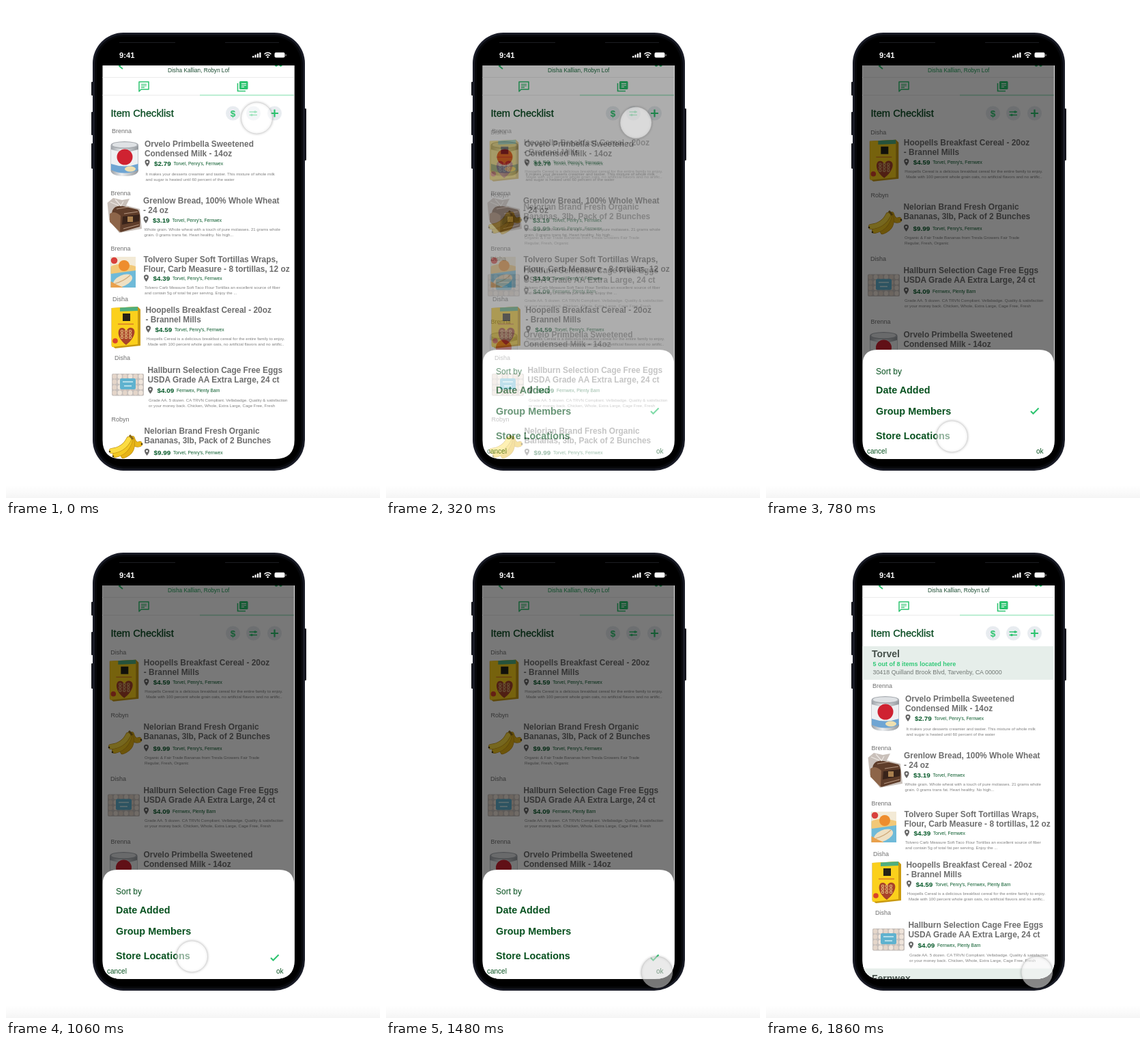
An HTML page that plays this animation: 548x720 px, repeating every 1.88 s.

```html
<!DOCTYPE html>
<html lang="en">
<head>
<meta charset="utf-8">
<title>Checklist sorting</title>
<style>
html, body { margin: 0; width: 100%; height: 100%; overflow: hidden; background: #fff; }
svg { display: block; width: 548px; height: 720px; font-family: "Liberation Sans", Arial, sans-serif; }
.label { font-size: 9px; fill: #707070; }
.title { font-size: 11.9px; font-weight: 700; fill: #6d6d6d; }
.price { font-size: 9.9px; font-weight: 700; fill: #075a2a; }
.stores { font-size: 6.65px; fill: #075a2a; }
.note { font-size: 6.08px; fill: #808080; }
.heading { font-size: 14.7px; fill: #074a20; stroke: #074a20; stroke-width: .3; }
.option { font-size: 14.4px; font-weight: 700; fill: #07511f; }
.small { font-size: 10px; fill: #07511f; }
</style>
</head>
<body>
<svg id="stage" viewBox="0 0 548 720"></svg>
<script>
const LOOP = 1880;
const GREEN = '#2cc46f';

const text = (cls, x, y, s, extra = '') =>
  `<text class="${cls}" x="${x}" y="${y}" ${extra}>${s.replace(/&/g, '&amp;')}</text>`;
const rect = (x, y, w, h, fill, r = 0, extra = '') =>
  `<rect x="${x}" y="${y}" width="${w}" height="${h}" rx="${r}" fill="${fill}" ${extra}/>`;
const disc = (x, y, r, fill) => `<circle cx="${x}" cy="${y}" r="${r}" fill="${fill}"/>`;
const oval = (x, y, rx, ry, fill, extra = '') =>
  `<ellipse cx="${x}" cy="${y}" rx="${rx}" ry="${ry}" fill="${fill}" ${extra}/>`;
const shape = (d, fill, extra = '') => `<path d="${d}" fill="${fill}" ${extra}/>`;
const line = (d, color, width = 1, extra = '') =>
  `<path d="${d}" fill="none" stroke="${color}" stroke-width="${width}" ${extra}/>`;
const group = (content, extra = '') => `<g ${extra}>${content}</g>`;
const repeat = (n, draw) => Array.from({ length: n }, (_, i) => draw(i)).join('');

function banana(d, color) {
  const round = 'stroke-linecap="round"';
  return line(d, '#b98a12', 8, round) + line(d, color, 6.800, round);
}

const pictures = {
  can: () =>
    shape('M153.500 204V241Q155 249 174 249Q192 249 194 241V204Z', 'url(#metal)') +
    oval(173.800, 203.500, 20.200, 5.500, '#a9adb2') + oval(173.800, 203.200, 18, 4, '#dfe2e5') +
    shape('M154 210Q174 217 193.500 210V239Q174 248 154 239Z', '#eef0f2') +
    shape('M154 231Q174 238 193.500 231V240Q174 249 154 240Z', '#6fa5d3') +
    oval(182, 238.500, 8, 4, '#efe0b0') + disc(174, 221, 11.500, '#cf2231'),
  bread: () =>
    shape('M148.500 288L157 281L170 284L181 282L176 292L196 297L199 326L166 332L151 313Z', '#c9c0ba') +
    shape('M156 299Q160 291 172 293L193 298Q198 303 196 323L168 331L152 315Z', '#5f3d2a') +
    shape('M152 304Q159 299 168 307L167 331L152 316Z', '#8d6549') +
    shape('M171 308L196 305L195 315L170 320Z', '#38231a') +
    line('M153 287L165 292M160 283L168 292M172 286L168 293', '#eee8e4', 1.300) +
    line('M162 297L180 294M173 304L193 301M172 326L195 320', '#b59680', 1.200) +
    rect(178, 308, 8, 8, '#a9804f'),
  tortillas: () =>
    rect(153.500, 367, 36.500, 45, '#6fbad8') +
    rect(153.500, 367, 36.500, 16, '#f3ead6') +
    shape('M153.500 381Q168 374 190 381V387L153.500 392Z', '#f2c877') +
    oval(171, 402, 15, 8, '#efe0c2', 'transform="rotate(-24 171 402)"') +
    shape('M153.500 403Q162 408 172 412H153.500Z', '#e9a04c') +
    line('M160 406Q172 403 182 394', '#cfa978', 1.200) +
    disc(158.500, 372.500, 4.800, '#d8413c') + disc(173, 380, 8, '#ee8d2e'),
  cereal: () =>
    shape('M154.500 442L193 440L197 444V497L160 501L154.500 497Z', '#c99a10') +
    shape('M155 442L193 440V495L155 499Z', '#fbd01c') +
    shape('M167 441.500L193 440V446L167 447Z', '#4fae7f') +
    rect(171, 450, 11, 11, '#252217') +
    line('M164 465.500H187', '#d97a28', 1.300) +
    shape('M176 496C161 485 163 471 170 471Q174 471 176 476Q179 470 184 471C192 473 189 486 176 496Z', '#a8432a') +
    repeat(9, i => `<circle cx="${170 + i % 3 * 6}" cy="${476 + (i / 3 | 0) * 4.500}" r="1.700" fill="none" stroke="#dcae72" stroke-width="1.2"/>`) +
    disc(160, 490, 3.800, '#d8432b'),
  eggs: () =>
    rect(155, 538, 47, 32.500, '#c6bfbb', 2) +
    repeat(24, i => oval(159 + i % 6 * 7.700, 542 + (i / 6 | 0) * 8, 3.200, 3.500, i % 2 ? '#efe4da' : '#e4d5c9')) +
    rect(167, 545, 23, 16, '#5fb2cf', 2) +
    line('M171 550H186M173 556H184', '#d2edf2', 1.500),
  bananas: () =>
    banana('M185 633Q188 644 196 641', '#e9b81a') +
    banana('M184 635Q188 652 172 658', '#e6b316') +
    banana('M182 634Q178 653 160 657', '#f3c921') +
    banana('M180 634Q173 649 155 651', '#fbdc43') +
    line('M181 628L186 634', '#8a6a18', 3) +
    disc(152, 652, 1.300, '#4a3a12') + disc(157, 659, 1.300, '#4a3a12') + disc(199, 641, 1.300, '#4a3a12'),
};

const DAIRY = "Torvel, Penry's, Fernwex";
// label: [text, x, y], at: title start, price and note: offsets below the title
const items = {
  can: { label: ['Brenna', 155, 186], at: [203, 206], price: ['$2.79', 27.5], stores: DAIRY, noteY: 41.5,
    title: ['Orvelo Primbella Sweetened', 'Condensed Milk - 14oz'],
    note: ['It makes your desserts creamier and tastier. This mixture of whole milk', 'and sugar is heated until 60 percent of the water'] },
  bread: { label: ['Brenna', 153.5, 277], at: [201, 289], price: ['$3.19', 27.5], stores: DAIRY, noteY: 39.5,
    title: ['Grenlow Bread, 100% Whole Wheat', '- 24 oz'],
    note: ['Whole grain. Whole wheat with a touch of pure molasses. 21 grams whole', 'grain. 0 grams trans fat. Heart healthy. No high...'] },
  tortillas: { label: ['Brenna', 153.5, 358], at: [201.5, 374.5], price: ['$4.39', 27.5], stores: DAIRY, noteY: 39.5,
    title: ['Tolvero Super Soft Tortillas Wraps,', 'Flour, Carb Measure - 8 tortillas, 12 oz'],
    note: ['Tolvero Carb Measure Soft Taco Flour Tortillas an excellent source of fiber', 'and contain 5g of total fat per serving. Enjoy the ...'] },
  cereal: { label: ['Disha', 156, 432], at: [204.5, 448.5], price: ['$4.59', 28], stores: DAIRY, noteY: 40,
    title: ['Hoopells Breakfast Cereal - 20oz', '- Brannel Mills'],
    note: ['Hoopells Cereal is a delicious breakfast cereal for the entire family to enjoy.', ' Made with 100 percent whole grain oats, no artificial flavors and no artific..'] },
  eggs: { label: ['Disha', 159, 518], at: [207.5, 536.5], price: ['$4.09', 29.5], stores: 'Fernwex, Plenty Barn', noteY: 42,
    title: ['Hallburn Selection Cage Free Eggs', 'USDA Grade AA Extra Large, 24 ct'],
    note: ['Grade AA. 5 dozen. CA TRVN Compliant. Vellabadge. Quality & satisfaction', 'or your money back. Chicken, Whole, Extra Large, Cage Free, Fresh'] },
  bananas: { label: ['Robyn', 154.5, 608], at: [202.5, 626], price: ['$9.99', 30.5], stores: DAIRY, noteY: 43,
    title: ['Nelorian Brand Fresh Organic', 'Bananas, 3lb, Pack of 2 Bunches'],
    note: ['Organic & Fair Trade Bananas from Tresla Growers Fair Trade', 'Regular, Fresh, Organic'] },
};

function pin(x, y) {
  return shape(`M${x} ${y + 5}C${x - 5.4} ${y - 1} ${x - 4} ${y - 5.2} ${x} ${y - 5.2}S${x + 5.4} ${y - 1} ${x} ${y + 5}Z`, '#666') +
    disc(x, y - 1.500, 1.400, '#fff');
}

function item(key, dx = 0, dy = 0, stores = items[key].stores) {
  const { label, at: [x, y], price, title, note, noteY } = items[key];
  const priceY = y + price[1];
  return group(
    pictures[key]() +
    text('label', label[1], label[2], label[0]) +
    title.map((s, i) => text('title', x, y + i * 14, s)).join('') +
    pin(x + 4, priceY - 3.500) +
    text('price', x + 14, priceY, price[0]) +
    text('stores', x + 42.500, priceY - .8, stores) +
    note.map((s, i) => text('note', x + 1.500 + (s[0] === ' ' ? 2 : 0), y + noteY + i * 8, s.trim())).join(''),
    `transform="translate(${dx} ${dy})"`);
}

function header(nameColor) {
  const slider = y => line(`M356.500 ${y}H368`, GREEN, 1.300);
  return rect(141, 87, 282, 576, '#fff') +
    line('M171 84L166 88L171 92', GREEN, 1.800) +
    disc(396, 86.500, 2.200, GREEN) + disc(402.500, 86.500, 2.200, GREEN) +
    text('', 237, 97, 'Disha Kallian, Robyn Lof', `font-size="8.26" fill="${nameColor}"`) +
    line('M141 104.500H422M141 130.500H284', '#ececec') +
    line('M284 130.500H422', '#a5e8c4', 1.500) +
    line('M195 111H209V122H198L195 125Z', GREEN, 1.500, 'stroke-linejoin="round"') +
    line('M198 114.500H206M198 116.800H206M198 119.100H203', GREEN, 1.100) +
    rect(342, 110, 12.500, 12, GREEN, 1.500) +
    line('M339.500 113V124.500H351', GREEN, 1.600) +
    line('M345 113.500H352M345 116H352M345 118.500H349', '#fff', 1.200) +
    text('heading', 153.500, 162, 'Item Checklist') +
    [332.500, 362.500, 393.500].map(x => disc(x, 157, 10.500, '#e8ecf0')).join('') +
    text('', 332.500, 162, '$', `font-size="13.5" font-weight="700" text-anchor="middle" fill="${GREEN}"`) +
    slider(155) + slider(159.500) + disc(365, 155, 1.700, GREEN) + disc(360, 159.500, 1.700, GREEN) +
    line('M388 157H399M393.500 151.500V162.500', GREEN, 2.200);
}

const tick = (id, y) =>
  line(`M388 ${y}L391.500 ${y + 3.5}L399.500 ${y - 4.5}`, GREEN, 2, `id="${id}"`);

const storeBand = (y, name, nameY = y + 16) => rect(141, y, 281, 49, '#e6eeea') +
  text('', 155, nameY, name, 'font-size="14" font-weight="700" fill="#45504a"');

const byDate = header('#1d4d33') + Object.keys(items).map(key => item(key)).join('');

const sortSheet = header('#1fa35a') +
  item('cereal', -2.700, -244.300) + item('bananas', -1, -328) + item('eggs', -6, -145.500) + item('can', -1.500, 279) +
  rect(141, 87, 281, 576, '#000', 0, 'opacity=".53"') +
  shape('M141.500 663V525Q141.500 503 163.500 503H400Q422 503 422 525V663Z', '#fff') +
  text('', 161, 539, 'Sort by', 'font-size="12" fill="#07511f"') +
  text('option', 161, 566.500, 'Date Added') +
  text('option', 161, 598, 'Group Members') +
  text('option', 161, 634, 'Store Locations') +
  tick('memberTick', 593) + tick('storeTick', 632) +
  text('small', 148, 655, 'cancel') + text('small', 396, 655, 'ok');

const SHORT = 'Torvel, Fernwex';
const byStore = header('#1d4d33') +
  storeBand(176, 'Torvel') +
  text('', 156.500, 205, '5 out of 8 items located here', 'font-size="9.03" font-weight="700" fill="#32c978"') +
  text('', 156.500, 217, '30418 Quilland Brook Blvd, Tarvenby, CA 00000', 'font-size="8.9" fill="#727875"') +
  item('can', 1, 51) + item('bread', 1, 51, SHORT) + item('tortillas', 1, 51, SHORT) +
  item('cereal', 1, 51, DAIRY + ', Plenty Barn') + item('eggs', 1, 51) +
  storeBand(647.500, 'Fernwex', 666.500);

const phone =
  [[125, 111, 20], [125, 155, 34], [125, 201, 37], [436, 150, 76]].map(([x, y, h]) => rect(x, y, 4, h, '#14151c', 1)).join('') +
  rect(127, 39, 311, 641, '#191b26', 45) +
  rect(130, 42, 305, 635, '#07080b', 42) +
  rect(133, 45, 299, 629, '#000', 39) +
  line('M166 53.500H248M321 53.500H400', '#1c1d22');

const statusBar =
  text('', 166, 76, '9:41', 'font-size="11.2" font-weight="700" fill="#fff"') +
  repeat(4, i => rect(361 + i * 3.400, 73 - i * 1.700, 2.300, 2.500 + i * 1.700, '#fff', .6)) +
  line('M378.500 70.500Q383.500 66 388.500 70.500M380.500 72.700Q383.500 70 386.500 72.700', '#fff', 1.500) +
  disc(383.500, 74.800, 1.300, '#fff') +
  rect(393.500, 68, 15, 7.500, '#fff', 2) + rect(409.500, 70.500, 1.200, 2.800, '#aaa', .5);

document.getElementById('stage').innerHTML = `
  <defs>
    <linearGradient id="metal"><stop stop-color="#9a9fa5"/><stop offset=".4" stop-color="#eceef0"/><stop offset="1" stop-color="#92979c"/></linearGradient>
    <linearGradient id="floor" x2="0" y2="1"><stop stop-color="#fff"/><stop offset="1" stop-color="#f5f5f5"/></linearGradient>
    <clipPath id="screen"><path d="M141.500 87H422.700V635Q422.700 663 394 663H169.500Q141.500 663 141.500 635Z"/></clipPath>
    <filter id="shadow" x="-30%" y="-30%" width="160%" height="160%"><feGaussianBlur stdDeviation="1.6"/></filter>
  </defs>
  ${rect(0, 0, 548, 720, '#fff') + rect(0, 702, 548, 18, 'url(#floor)')}
  ${phone + statusBar}
  <g clip-path="url(#screen)">
    ${group(byDate)}
    ${group(sortSheet, 'id="sheet"')}
    ${group(byStore, 'id="sorted"')}
  </g>
  <g id="cursor">
    <circle r="23" fill="none" stroke="#000" stroke-opacity=".24" stroke-width="1.6" filter="url(#shadow)"/>
    <circle id="touch" r="23" fill-opacity=".55" stroke="#999" stroke-opacity=".4" stroke-width=".7"/>
  </g>`;

const el = id => document.getElementById(id);
const parts = Object.fromEntries(['sheet', 'sorted', 'memberTick', 'storeTick', 'cursor', 'touch'].map(id => [id, el(id)]));

function ease(t, from, to) {
  const u = Math.min(1, Math.max(0, (t - from) / (to - from)));
  return u * u * (3 - 2 * u);
}

function render(t) {
  const toStores = ease(t, 300, 595);
  const toOk = ease(t, 1090, 1370);
  const switched = ease(t, 780, 940);
  const press = ease(t, 1370, 1470) * (1 - .7 * ease(t, 1500, 1630));
  const grey = 255 - 38 * press;

  parts.sheet.setAttribute('opacity', ease(t, 190, 420));
  parts.sorted.setAttribute('opacity', ease(t, 1490, 1630));
  parts.memberTick.setAttribute('opacity', 1 - switched);
  parts.storeTick.setAttribute('opacity', switched);
  parts.cursor.setAttribute('transform',
    `translate(${367.5 - 95 * toStores + 124.5 * toOk} ${164 + 466 * toStores + 23 * toOk})`);
  parts.touch.setAttribute('fill', `rgb(${grey},${grey},${grey})`);
}

const start = performance.now();
function frame() {
  render((performance.now() - start) % LOOP);
  requestAnimationFrame(frame);
}
frame();
</script>
</body>
</html>
```
